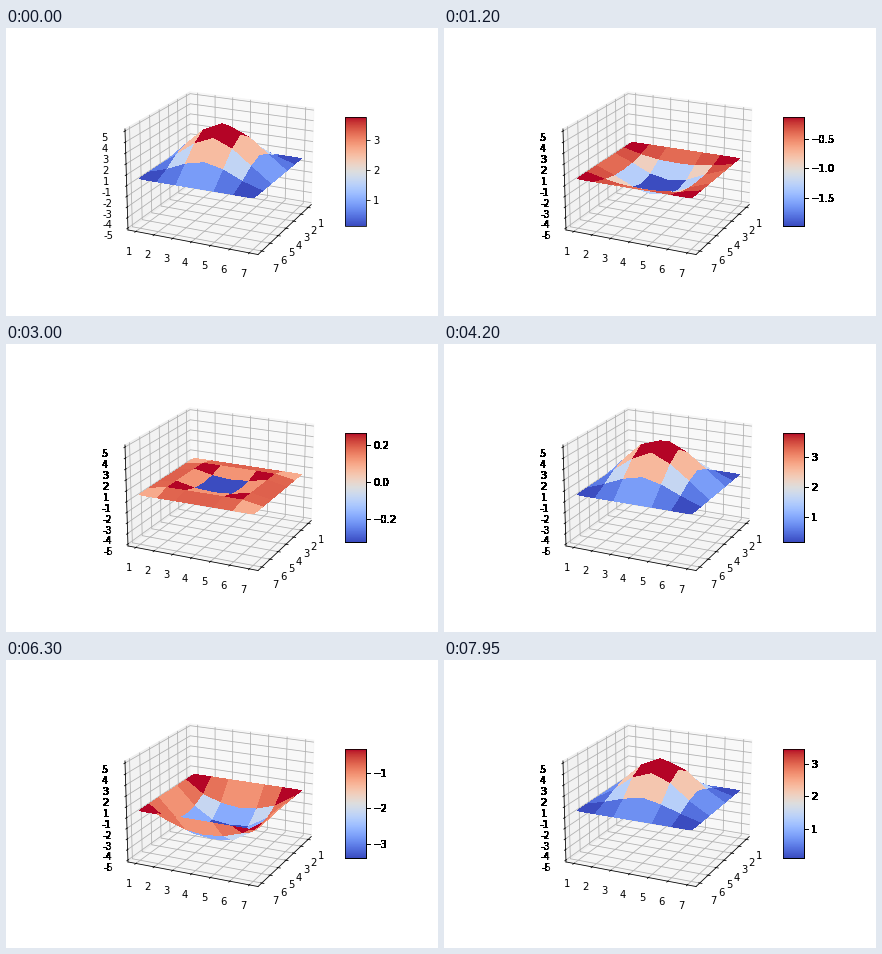
Recreate the animation shown at these times as a matplotlib script. Size 432 by 288 pixels, loop 8000 ms.

```python
import numpy as np
import matplotlib.pyplot as plt
from matplotlib.animation import FuncAnimation
from matplotlib.ticker import FormatStrFormatter

TICK_MS, TICKS_PER_STEP, TICKS = 50, 3, 160
COURANT_SQ = 0.09
QUARTER = np.array([[0.5, 1.5, 2], [1.5, 3, 4], [2, 4, 5]])


def laplacian(u):
    out = np.zeros_like(u)
    out[1:-1, 1:-1] = (u[2:, 1:-1] + u[:-2, 1:-1] + u[1:-1, 2:]
                       + u[1:-1, :-2] - 4 * u[1:-1, 1:-1])
    return out


def membrane(steps):
    """Leapfrog solution of the wave equation, released from rest."""
    bump = np.pad(QUARTER, ((0, 2), (0, 2)), mode="reflect")
    prev = now = np.pad(bump, 1)
    states = []
    for _ in range(steps):
        prev, now = now, 2 * now - prev + COURANT_SQ * laplacian(now)
        states.append(now)
    return states


def solid(img, dpi):
    """Make every touched pixel opaque, which hardens text edges."""
    img = np.rint(img * 255).astype(np.uint8)
    img[..., 3] = np.where(img[..., 3] > 0, 255, 0)
    return img, 0, 0


plt.rcParams.update({"font.family": "DejaVu Sans", "font.size": 10})
states = membrane(-(-TICKS // TICKS_PER_STEP))
grid_x, grid_y = np.meshgrid(np.arange(1, 8), np.arange(1, 8))

fig = plt.figure(figsize=(6, 4), dpi=72, facecolor="white")
fig.subplots_adjust(left=0.125, right=0.9, bottom=0.125, top=0.88)
ax = fig.add_subplot(projection="3d")
ax.view_init(20, 25)


def plot_state(u):
    surf = ax.plot_surface(grid_x, grid_y, u, rstride=1, cstride=1,
                           cmap="coolwarm", linewidth=0, antialiased=False)
    surf.autoscale()
    return surf


cbar = fig.colorbar(plot_state(states[0]), ax=ax, shrink=0.5, aspect=5)

# Limits with the small margin around the data box
pad = 25 / 24
ax.set_xlim(4 - 3.3 * pad, 4 + 3.3 * pad)
ax.set_ylim(4 - 3.3 * pad, 4 + 3.3 * pad)
ax.set_zlim(-5 * pad, 5 * pad)
ax.set_xticks(range(1, 8))
ax.set_yticks(range(1, 8))
ax.set_zticks(np.linspace(-5, 5, 10))
ax.zaxis.set_major_formatter(FormatStrFormatter("%.0f"))


def update(tick):
    step = tick // TICKS_PER_STEP
    for old in list(ax.collections):
        old.remove()
    cbar.update_normal(plot_state(states[step]))
    for axes in (ax, cbar.ax):
        axes.set_agg_filter(solid if step else None)
    return []


anim = FuncAnimation(fig, update, frames=TICKS, interval=TICK_MS,
                     init_func=lambda: [], repeat=True, repeat_delay=0,
                     blit=False)
plt.show()
```
